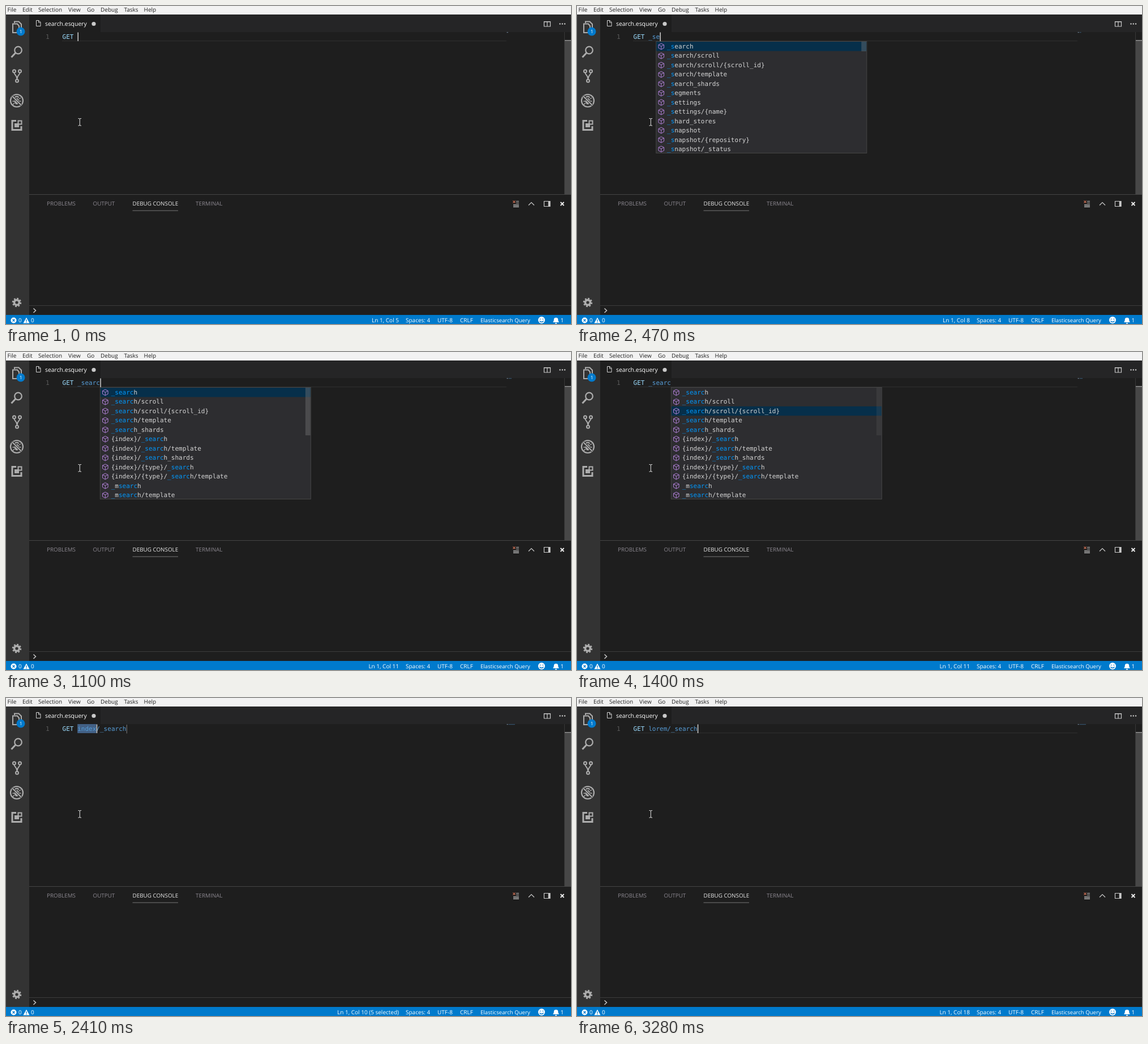
An HTML page for the animation above (3.36 s loop, 998x561 px).

```html
<!DOCTYPE html>
<html lang="en">
<head>
<meta charset="utf-8">
<title>Query editor</title>
<style>
html, body { margin: 0; width: 100%; height: 100%; overflow: hidden; background: #1e1e1e }
svg { display: block }
text { font-family: "Open Sans", "Noto Sans", sans-serif; text-rendering: geometricPrecision; white-space: pre }
.code { font: 11.03px "DejaVu Sans Mono", monospace }
.line { fill: none; stroke: #adadad }
</style>
</head>
<body>
<svg width="998" height="561" viewBox="0 0 998 561">
  <defs>
    <g id="method" fill="none" stroke="#b180d7" stroke-linejoin="round">
      <path d="M5.5 .7L10.3 3V8.6L5.5 11.2L.7 8.6V3ZM.7 3L5.5 5.5L10.3 3M5.5 5.5V11"/>
    </g>
    <g id="module">
      <path d="M0 4L6 1.5L11 3.5V7.5L5 10L0 7.8Z" fill="#75beff"/>
      <path d="M0 4L5 6L11 3.5" fill="none" stroke="#2d5f86" stroke-width=".8"/>
    </g>
  </defs>

  <rect width="998" height="15" fill="#f2f2f2"/>
  <rect y="15" width="41" height="530" fill="#333"/>
  <rect x="41" y="15" width="957" height="31" fill="#252526"/>
  <rect x="41" y="15" width="126" height="31" fill="#1e1e1e"/>
  <rect x="41" y="332" width="957" height="1" fill="#454545"/>
  <rect x="41" y="528" width="957" height="1" fill="#3c3c3c"/>
  <rect y="545" width="998" height="16" fill="#007acc"/>

  <!-- editor scrollbar -->
  <rect x="986" y="46" width="1" height="286" fill="#383838"/>
  <rect x="987" y="61" width="11" height="271" fill="#474747"/>
  <rect x="987" y="60" width="11" height="1.5" fill="#909090"/>

  <!-- activity bar -->
  <g class="line" stroke-width="2">
    <path d="M15 30V27.500H22.500L27 32V42H24"/>
    <path d="M12 31.500H20L23 35V47H12Z" fill="#333"/>
    <circle cx="21.500" cy="78" r="6.300" stroke-width="2.200"/>
    <path d="M17 82.500L9.500 90.500" stroke-width="3"/>
    <circle cx="14.500" cy="115" r="2.500"/>
    <circle cx="24.500" cy="115" r="2.500"/>
    <circle cx="19.500" cy="132" r="2.500"/>
    <path d="M14.500 118C15 122 19.500 122 19.500 129M24.500 118C24 122 19.500 122 19.500 129"/>
    <circle cx="19" cy="167" r="11" stroke-width="2.200"/>
    <path d="M12 162L15 164M26 162L23 164M11.500 168H26.500M12 174L15 171M26 174L23 171" stroke-width="1.300"/>
    <ellipse cx="19" cy="168" rx="4" ry="5.500" fill="#adadad" stroke="none"/>
    <path d="M15.500 161.500Q19 157.500 22.500 161.500"/>
    <path d="M11 159L27 175" stroke="#333" stroke-width="4"/>
    <path d="M11 159L27 175" stroke-width="2"/>
    <path d="M18 202.500H11V218.500H27V212" stroke-width="3"/>
    <path d="M15 207H23V214H15Z" fill="#adadad" stroke="none"/>
    <path d="M21.500 202.500H27.500V208.500H21.500Z"/>
    <circle cx="19" cy="523" r="4.400" stroke-width="3.600"/>
    <circle cx="19" cy="523" r="7" stroke-width="2.500" stroke-dasharray="2.900 2.598"/>
  </g>
  <circle cx="26" cy="45" r="7.500" fill="#007acc"/>

  <!-- tab bar -->
  <path d="M53.500 25.500H58L61 28.500V35.500H53.500ZM57.500 25.500V29H61" fill="none" stroke="#d0d0d0"/>
  <circle cx="155" cy="31.500" r="3.600" fill="#c9c9c9"/>
  <path d="M950.500 27.500H961.500V36H950.500ZM956 27V36M950 28H962" fill="none" stroke="#c8c8c8" stroke-width="1.200"/>
  <g fill="#c8c8c8">
    <circle cx="978.500" cy="31.500" r="1.200"/><circle cx="982.800" cy="31.500" r="1.200"/><circle cx="987" cy="31.500" r="1.200"/>
  </g>

  <!-- panel -->
  <rect x="223.500" y="360.500" width="80.500" height="1" fill="#777"/>
  <g fill="none" stroke="#c8c8c8" stroke-width="1.200">
    <path d="M901 344.500H906M901 347.500H906M896 350.500H906M896 352.500H906M896 354.500H906"/>
    <path d="M895.500 343.500L899.500 347.500M899.500 343.500L895.500 347.500" stroke="#c2694f"/>
    <path d="M923 351.500L928 346.500L933 351.500"/>
    <path d="M950.500 344.500H961V353.500H950.500Z"/>
    <path d="M959.500 344.500V353.500" stroke-width="3.500"/>
    <path d="M979.500 346L985.500 352M985.500 346L979.500 352" stroke="#eee" stroke-width="1.800"/>
    <path d="M48.500 533.500L52.500 537.300L48.500 541" stroke-width="1.500"/>
  </g>

  <!-- status bar -->
  <g fill="#fff">
    <circle cx="13.500" cy="554.500" r="5"/>
    <path d="M36 549.500L41.500 559.500H30.500Z"/>
    <circle cx="946" cy="554" r="6"/>
    <path d="M966 558C968 556 967.500 554 968 552C968.500 549 974.500 549 975 552C975.500 554 975 556 977 558ZM970 559H973V560.500H970Z"/>
  </g>
  <g fill="none" stroke="#007acc" stroke-width="1.300">
    <path d="M11.500 552.500L15.500 556.500M15.500 552.500L11.500 556.500M36 553V556.500M36 557.300V558.500"/>
    <path d="M943.500 551.500V553.200M948.500 551.500V553.200M942.500 555.500Q946 559.500 949.500 555.500"/>
  </g>

  <g id="labels"></g>
  <g id="live"></g>
  <path d="M127.500 198.500H129.500L130.300 199.500L131 198.500H133M130.300 199V210.500M127.500 211H129.500L130.300 210L131 211H133" fill="none" stroke="#e8e8e8"/>
</svg>
<script>
const LOOP = 3360, CHAR = 6.64, START = 126.2, ROW = 16.45;
const $ = id => document.getElementById(id);

const text = (x, y, s, fill, size, extra = '') =>
  `<text x="${x}" y="${y}" fill="${fill}" font-size="${size}" ${extra}>${s}</text>`;
const code = (x, y, s, fill) => `<text class="code" x="${x}" y="${y}" fill="${fill}">${s}</text>`;
const rect = (x, y, w, h, fill, extra = '') =>
  `<rect x="${x}" y="${y}" width="${w}" height="${h}" fill="${fill}" ${extra}/>`;
const colX = n => START + n * CHAR;

const row = (items, y, fill, size) => items.map(([x, s]) => text(x, y, s, fill, size)).join('');
$('labels').innerHTML =
  row([[2.5, 'File'], [29, 'Edit'], [57, 'Selection'], [110, 'View'], [143, 'Go'],
       [167, 'Debug'], [208.5, 'Tasks'], [243.5, 'Help']], 10.3, '#222', 10) +
  row([[72, 'PROBLEMS'], [153.5, 'OUTPUT'], [335, 'TERMINAL']], 352.3, '#8b878f', 9.86) +
  text(223.5, 352.3, 'DEBUG CONSOLE', '#e7e7e7', 9.86) +
  text(69, 35, 'search.esquery', '#fff', 10.43) +
  text(23.7, 48.3, '1', '#fff', 8.5) +
  row([[22, '0'], [44, '0'], [706, 'Spaces: 4'], [762, 'UTF-8'], [802, 'CRLF'], [979.5, '1']], 558.2, '#fff', 10) +
  text(838, 558.2, 'Elasticsearch Query', '#fff', 9.65) +
  code(70, 58.3, '1', '#5a5a5a');

const base = ['_search', '_search/scroll', '_search/scroll/{scroll_id}', '_search/template', '_search_shards'];
const byIndex = ['{index}/_search', '{index}/_search/template', '{index}/_search_shards',
  '{index}/{type}/_search', '{index}/{type}/_search/template'];
const full = [...base, ...byIndex, '_msearch', '_msearch/template'];
// query -> [suggestions, scroll thumb height]
const lists = {
  '_': [['_alias', '_alias/{name}', '_analyze', '_cache', '_cache/clear', '_cat', '_cat/aliases',
    '_cat/aliases/{name}', '_cat/allocation', '_cat/allocation/{node_id}', '_cat/count', '_cat/count/{index}'], 17],
  '_s': [[...base, '_segments', '_settings', '_settings/{name}', '_shard_stores', '_snapshot',
    '_snapshot/{repository}', '_snapshot/_status'], 17],
  '_se': [[...base, '_segments', '_settings', '_settings/{name}', ...byIndex.slice(0, 4)], 24],
  '_sea': [[...base, ...byIndex, '_settings/{name}', '_msearch'], 37],
  '_sear': [full, 60],
  '_searc': [full, 84]
};

// Each step changes only the fields it names.
const steps = [
  [0, { typed: '', caret: 0, on: 1, query: '', pick: 0, thumb: 1, snippet: 0, selected: 0 }],
  [80, { typed: '_', caret: 1 }],
  [150, { query: '_' }],
  [230, { typed: '_s', caret: 2 }],
  [300, { query: '_s' }],
  [470, { typed: '_se', caret: 3 }],
  [540, { typed: '_sea', caret: 4, query: '_se' }],
  [620, { query: '_sea' }],
  [870, { typed: '_sear', caret: 5, query: '_sear' }],
  [1100, { typed: '_searc', caret: 6, query: '_searc' }],
  [1250, { pick: 1, on: 0 }],
  [1400, { pick: 2, thumb: .4 }],
  [1480, { thumb: 0, on: 1 }],
  [1570, { pick: 3 }],
  [1720, { pick: 4 }],
  [1950, { pick: 5, on: 0 }],
  [2410, { typed: 'index/_search', caret: 5, on: 1, query: '', snippet: 1, selected: 5 }],
  ...[2640, 2720, 2890, 2970, 3050].map((t, i) =>
    [t, { typed: 'lorem'.slice(0, i + 1) + '/_search', caret: i + 1, selected: 0 }]),
  [3210, { caret: 13 }],
  [3280, { snippet: 0 }]
];

// Colours the letters matched in order by the query.
function matched(label, query) {
  let n = 0;
  return [...label].map(c => c === query[n]
    ? (n++, `<tspan fill="#0097fb">${c}</tspan>`) : c).join('');
}

function popup({ query, pick, thumb }) {
  const [items, height] = lists[query], x = colX(query.length) + .3;
  return rect(x, 62.5, 372, 197, '#2d2d30', 'stroke="#454545"') +
    rect(x + .5, 63 + pick * ROW, 371, ROW, '#062f4a') +
    rect(x + 362.5, 63, 8.7, height, '#797979', `fill-opacity="${.4 * thumb}"`) +
    items.map((label, i) => {
      const y = 71.3 + i * ROW, icon = label === '_cache' ? 'module' : 'method';
      return `<use href="#${icon}" x="${x + 3.5}" y="${y - 5.8}"/>` +
        code(x + 19.3, y + 3.7, matched(label, query), '#d4d4d4');
    }).join('');
}

function scene(s) {
  const { typed, caret, selected, snippet } = s, slash = typed.indexOf('/');
  let out = '';
  if (!selected) out += rect(99, 61, 785, 1.2, '#2d2d2d');
  if (snippet) {
    out += rect(START, 46, slash * CHAR, 16, selected ? '#426085' : '#3a3a3a') +
      rect(colX(typed.length) + .3, 47, 1, 15.5, '#808080');
  }
  out += code(99.6, 58.3, 'GET', '#9cdcfe') + code(START, 58.3, typed, '#569cd6');
  if (s.on) out += rect(colX(caret) + .3, 46.5, 1.5, 15.5, '#d0d0d0');
  out += rect(884.5, 46, 2.5, 1.2, '#66788a') + rect(888, 46, typed.length * .85, 1.2, '#34516b');
  if (s.query) out += popup(s);
  const note = selected ? ` (${selected} selected)` : '';
  return out + text(694, 558.2, `Ln 1, Col ${caret + 5}${note}`, '#fff', 10, 'text-anchor="end"');
}

let shown = -1;
function tick() {
  const t = performance.now() % LOOP;
  const past = steps.filter(([at]) => at <= t);
  if (past.length !== shown) {
    shown = past.length;
    $('live').innerHTML = scene(Object.assign({}, ...past.map(step => step[1])));
  }
  requestAnimationFrame(tick);
}
tick();
</script>
</body>
</html>
```
